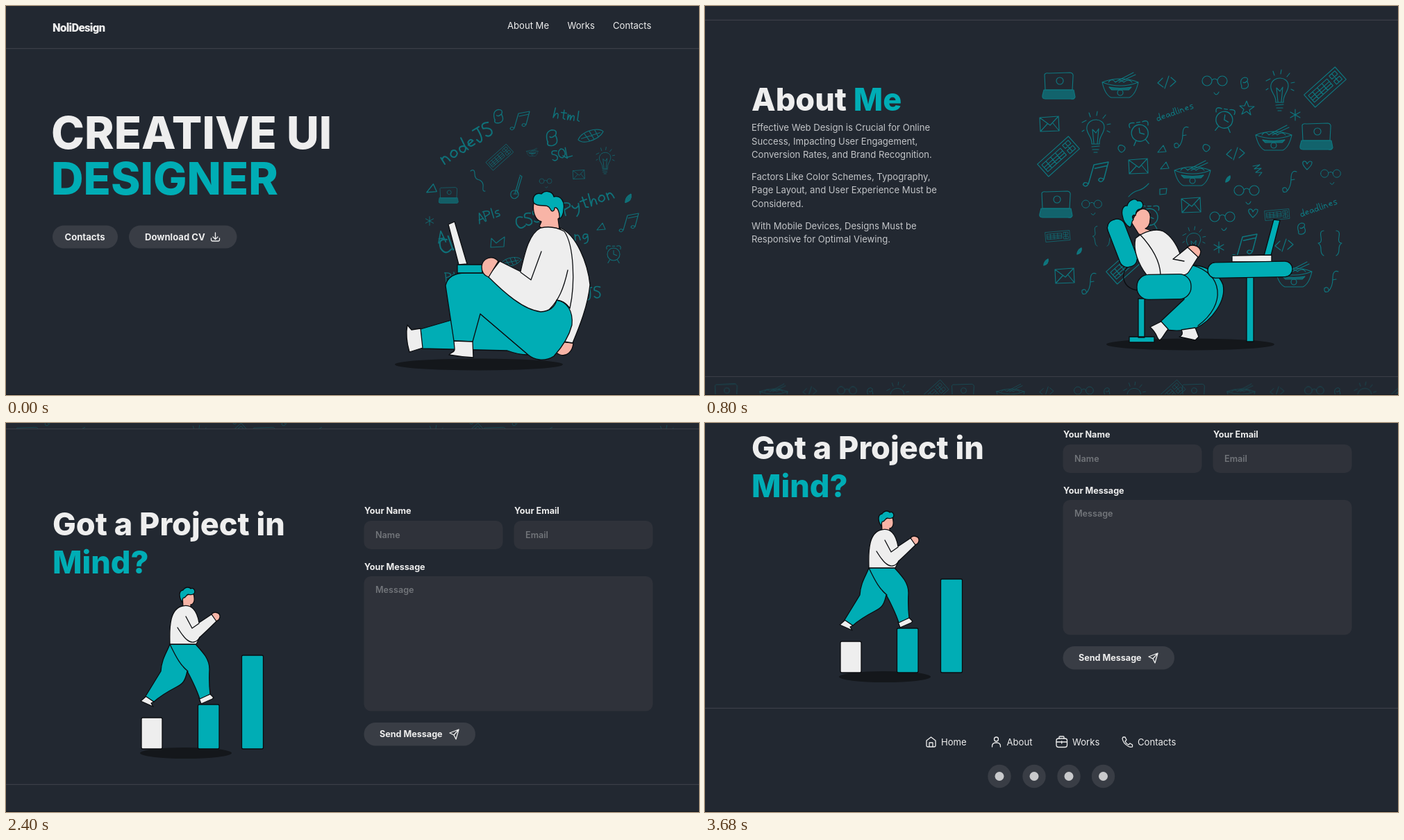
Write an HTML page that moves like this. It is 998 px wide and 561 px high and loops after 4 s.

```html
<!DOCTYPE html>
<html lang="en">
<head>
<meta charset="utf-8">
<title>Portfolio</title>
<style>
html, body { margin: 0; height: 100%; overflow: hidden; background: #222831; }
svg { display: block; width: 998px; height: 561px; }
text { font: 400 13.1px Inter, sans-serif; font-optical-sizing: none; fill: #eee; }
.h1 { font-size: 64.5px; font-weight: 800; }
.h2 { font-size: 45px; font-weight: 800; }
.b { font-weight: 700; }
.label { font-size: 12.6px; font-weight: 700; }
.hint { font-size: 12.6px; font-weight: 600; fill: #72757a; }
.copy text { fill: #c3c5c8; }
.mid { text-anchor: middle; }
.logo { font: 800 16.5px Roboto, sans-serif; font-stretch: 75%; letter-spacing: -.6px; }
.rule { stroke: #3b3e47; stroke-width: 1.2; }
.teal { fill: #00adb5; }
.white { fill: #eee; }
.skin { fill: #f8b4a6; }
.btn { fill: #393d45; }
.field { fill: #2f323a; }
.shade { fill: #14171b; }
.fig { stroke: #0b0d10; stroke-width: 1.3; stroke-linejoin: round; stroke-linecap: round; }
.line { fill: none; }
.icon { fill: none; stroke: #eee; stroke-width: 1.3; stroke-linecap: round; stroke-linejoin: round; }
.doodle { fill: none; stroke: #00adb5; stroke-width: 1.15; stroke-linecap: round; stroke-linejoin: round; }
.doodle .tint { fill: #00adb5; fill-opacity: .75; }
.pitch text { font-size: 5.6px; font-weight: 700; fill: #20242c; }
</style>
</head>
<body>
<svg viewBox="0 0 998 561">
<defs>
  <linearGradient id="lilac" x2="1" y2="1"><stop stop-color="#b07aff"/><stop offset=".5" stop-color="#9440ff"/><stop offset="1" stop-color="#7c10ff"/></linearGradient>
  <linearGradient id="sky" x2="1" y2="1"><stop stop-color="#e8f3fc"/><stop offset=".55" stop-color="#8bc7f2"/><stop offset="1" stop-color="#a674e0"/></linearGradient>
  <linearGradient id="moon" x1=".7" x2=".3" y2="1"><stop offset=".2" stop-color="#0b0d10"/><stop offset=".6" stop-color="#4a4f53"/><stop offset="1" stop-color="#a9adb0"/></linearGradient>
  <radialGradient id="earth"><stop stop-color="#54809c"/><stop offset=".7" stop-color="#2f5f86"/><stop offset="1" stop-color="#12283f"/></radialGradient>
  <clipPath id="band"><path d="M0 8H998V521H0Z"/></clipPath>
  <g id="tile" class="doodle"></g>
</defs>

<g id="page">
  <!-- hero -->
  <g>
    <text class="logo" x="67" y="37">NoliDesign</text>
    <text x="722" y="32.5">About Me</text><text x="808.5" y="32.5">Works</text><text x="874" y="32.5">Contacts</text>
    <path class="rule" d="M0 61.3H998"/>
    <text class="h1" x="65" y="206">CREATIVE UI</text>
    <text class="h1 teal" x="65" y="272">DESIGNER</text>
    <rect class="btn" x="67" y="316.5" width="94" height="33" rx="16.5"/>
    <rect class="btn" x="177" y="316.5" width="155.5" height="33" rx="16.5"/>
    <text class="b mid" x="113.5" y="337.5">Contacts</text><text class="b" x="200" y="337.5">Download CV</text>
    <path class="icon" d="M301.5 327V336M298 333L301.5 336.5L305 333M295.5 335V337Q295.5 339 297.5 339H305.5Q307.5 339 307.5 337V335"/>
    <g id="cloud" class="doodle" opacity=".55"></g>
    <ellipse class="shade" cx="681" cy="517" rx="121" ry="8.5"/>
    <g class="fig">
      <path class="skin" d="M797 484L817 486C816 499 807 506 798 503C789 500 790 492 797 484Z"/>
      <path class="white" d="M798 320C822 330 838 372 841 402C838 432 826 462 816 486L797 483C805 456 812 430 814 412Z"/>
      <path class="teal" d="M597 466L645 452L683 444L752 503C742 503 730 500 722 497L599 494Z"/>
      <path class="white" d="M578 460L584 467L597 465L600 493L581 499C577 485 576 470 578 460Z"/>
      <path class="teal" d="M633 403C636 390 648 385 662 385H694L793 424C808 426 817 440 815 460C810 480 798 495 789 505C775 514 760 510 752 503L683 444L672 484L645 483Z"/>
      <path class="white" d="M645 483L672 484L673 507Q655 506 638 503C640 499 647 500 646 494Z"/>
      <path class="skin" d="M768 318L771 311C761 309 758 294 760 284L790 280L801 294C801 302 797 306 795 307L797 322Q780 326 768 318Z"/>
      <path class="white" d="M770 320Q788 316 804 325C818 345 820 400 812 436C806 427 800 425 793 424C791 432 785 440 770 441C745 438 718 414 694 390L711 368L741 383C748 352 754 328 770 320Z"/>
      <path class="line" d="M771 354L756 395L741 384M809 381C803 408 796 424 783 437"/>
      <path class="teal" d="M760 284C757 275 763 268 771 271C777 265 787 267 789 275C799 273 805 282 803 293C803 300 800 306 797 307C798 298 794 289 790 291C790 296 786 298 784 293C779 283 768 292 760 284Z"/>
      <path class="teal" d="M650 373H686V385H650Z"/>
      <path class="white" d="M637 315L646 311L664 372L652 373Z"/>
      <path class="skin" d="M709 368C700 358 686 364 685 376C685 384 689 389 695 391Z"/>
    </g>
  </g>

  <!-- about -->
  <g transform="translate(0 542)">
    <path class="rule" d="M0 20.3H998"/>
    <text class="h2" x="67" y="151">About <tspan class="teal">Me</tspan></text>
    <g id="copy" class="copy"></g>
    <use href="#tile" opacity=".6"/>
    <ellipse class="shade" cx="699" cy="488" rx="121" ry="8.5"/>
    <g class="fig">
      <path class="line" d="M608 377C598 386 601 407 623 410"/>
      <rect class="teal" x="588" y="306" width="26" height="72" rx="12" transform="rotate(-21 601 342)"/>
      <path class="teal" d="M624 422H633V478H624ZM611 477H647V485H611Z"/>
      <path class="teal" d="M683 379C705 366 738 380 746 402C751 425 730 454 706 465Q684 470 664 467L655 456L690 423Z"/>
      <path class="line" d="M703 374C745 386 752 430 710 461"/>
      <path class="white" d="M641 463L657 455L667 466C660 475 659 479 655 482C650 480 653 474 641 463ZM686 467L706 464L711 477L706 482L683 477Q690 474 686 467Z"/>
      <path class="skin" d="M614 312L622 297C633 287 643 296 641 308C641 316 637 320 634 321L643 324L626 331Z"/>
      <path class="teal" d="M601 302C599 292 604 287 608 288C610 280 619 276 623 281C631 280 634 290 626 293C620 294 621 299 620 302C616 300 614 304 617 308C613 311 616 317 612 319C604 315 602 308 601 302Z"/>
      <path class="skin" d="M693 350C698 342 712 344 714 354Q713 363 706 365Z"/>
      <path class="white" d="M620 335C632 325 650 320 660 325C672 332 679 344 684 357L695 348L710 362L697 383Q694 388 687 388H636C624 372 616 352 620 335Z"/>
      <path class="line" d="M626 329C642 346 655 366 656 387M684 357L674 365L690 368"/>
      <rect class="teal" x="622" y="387" width="78" height="36" rx="17" transform="rotate(-1 661 405)"/>
      <path class="teal" d="M780 391H790V484H780ZM805 360L819 308L828 309L815 360Z"/>
      <path class="white" d="M759 360L816 359V369H759Z"/>
      <rect class="teal" x="724" y="369" width="122" height="22.5" rx="11" transform="rotate(-1 785 380)"/>
    </g>
  </g>

  <!-- works -->
  <g transform="translate(0 1068)">
    <g id="wall" clip-path="url(#band)" opacity=".28"></g>
    <path class="rule" d="M0 8.5H998M0 521.5H998"/>
    <text class="h2" x="67" y="160">My Recent <tspan class="teal">Works</tspan></text>
    <g id="chips"></g>

    <path fill="#7900ff" d="M99 296H300.5V416H99Z"/>
    <path fill="#fff" d="M129 309Q129 305 133 305L146 370L270 405L134 407Q131 407 131 404Z"/>
    <path fill="url(#lilac)" d="M130 309Q129 305.5 134 305.5H266Q270 305.5 270 309V405L157 395Q137 392 135 378Z"/>
    <g fill="#fff"><path d="M211 373H229V378H211Z"/><path opacity=".35" d="M169 373H210V378H169ZM173 367H228V368H173Z"/><rect x="260" y="327" width="24" height="24" rx="4"/></g>
    <circle cx="272" cy="339" r="6.5" fill="#7900ff"/>
    <path fill="#6a3fd0" d="M199 325H217V339H199Z"/>
    <path fill="#f6a13c" d="M197 327H206V334H197ZM192 345H210V353H192ZM214 333H218V345H214Z"/>
    <path fill="#35206b" d="M181 341H187V354H181ZM219 339H225V354H219ZM204 335H210V348H204ZM175 353H228V354H175Z"/>
    <g fill="#f5c2a8"><circle cx="184" cy="338" r="2"/><circle cx="222" cy="336" r="2"/><circle cx="207" cy="332" r="2"/></g>
    <text class="b mid" x="200" y="363" style="font-size:6.7px">LEARN UI/UX DESIGN</text>
    <text x="135" y="311" style="font-size:3px">COURSES</text><text x="192" y="311" style="font-size:3px">Home &#160; Lessons &#160; Contact &#160; About</text>

    <path fill="#c9cbce" d="M512 359L551 360L596 374L540 392L500 382Z"/>
    <path stroke="#f2f2f2" stroke-width="1.2" d="M528 364L578 376M519 368L567 381M510 373L556 386"/>
    <rect x="473" y="305" width="78" height="57" rx="3" fill="#f7f8fa"/>
    <path fill="url(#sky)" d="M513 310Q532 313 548 310V360H505Q523 340 513 310Z"/>
    <path fill="#5b52b8" d="M520 327L535 323L540 344L522 347Z"/>
    <g class="pitch"><text x="477" y="326">Start Working</text><text x="477" y="333">as a UI/UX Designer</text></g>
    <g transform="translate(426 316) rotate(19)">
      <rect width="93" height="70" rx="4" fill="#f4f6f9"/>
      <path fill="url(#sky)" d="M52 10Q70 16 90 8V66H44Q62 42 52 10Z"/>
      <path fill="#5b52b8" d="M58 30L73 25L78 42L85 56L62 60Z"/><path fill="#2b2f45" d="M60 50L84 48L80 64L66 66Z"/><circle cx="66" cy="24" r="4" fill="#e77e6b"/>
      <g class="pitch"><text x="5" y="14">Start Working</text><text x="5" y="22">as a UI/UX Designer</text></g>
      <rect x="5" y="33" width="12" height="4" rx="2" fill="#53bde3"/>
    </g>

    <g id="phones"></g>
    <circle cx="799" cy="333" r="22.5" fill="url(#moon)" stroke="#e7664c" stroke-width=".8"/>
    <text class="b mid" x="797.5" y="365" style="font-size:5.7px">Explore Our Solar</text>
    <text class="b mid" x="797.5" y="372" style="font-size:5.7px">System</text>
    <path stroke="#8c8f92" stroke-width=".7" d="M783 378H812M787 381H808"/>
    <rect x="788" y="388" width="19" height="7" rx="3.5" fill="none" stroke="#e7664c"/>
    <text class="mid" x="797.5" y="393" style="font-size:3.5px">Start</text>
  </g>

  <!-- contact -->
  <g transform="translate(0 1581)">
    <path class="rule" d="M0 521.3H998"/>
    <text class="h2" x="67" y="162">Got a Project in</text><text class="h2 teal" x="67" y="217">Mind?</text>
    <ellipse class="shade" cx="259" cy="476" rx="66" ry="8"/>
    <g class="fig">
      <rect class="white" x="195" y="425" width="30" height="45" rx="2"/>
      <rect class="teal" x="276.5" y="406" width="30.5" height="64" rx="2"/>
      <rect class="teal" x="339.5" y="335" width="31" height="135" rx="2"/>
      <path class="white" d="M202 394L213 402L209 404L212 409L194 401ZM278 397L294 391L299 396L297 398L281 405Z"/>
      <path class="teal" d="M236 319H273C283 330 293 340 293 355Q292 375 294 391L279 398C275 385 265 365 261 358C258 372 255 376 245 381Q224 392 213 402L201 394L223 358C224 340 232 330 236 319Z"/>
      <path class="line" d="M236 319C246 340 252 350 262 358"/>
      <path class="skin" d="M254 249L270 246C272 253 272 261 266 262V266L255 266Z"/>
      <path class="teal" d="M254 259C249 252 248 242 255 241C259 235 265 237 266 239C272 236 274 246 269 247C264 249 262 245 260 249L257 252Q254 251 254 259Z"/>
      <path class="skin" d="M296 276C299 271 309 273 308 280Q307 285 302 286Z"/>
      <path class="white" d="M236 319C235 290 237 268 254 264C267 261 275 270 278 288L296 276L303 286Q289 300 279 309L274 319Z"/>
      <path class="line" d="M259 279L268 296L278 289M247 295C255 308 262 317 270 316Q276 315 279 309"/>
    </g>
    <text class="label" x="516" y="131">Your Name</text><text class="label" x="732" y="131">Your Email</text><text class="label" x="516" y="211.5">Your Message</text>
    <rect class="field" x="515.5" y="141" width="200" height="41" rx="10"/>
    <rect class="field" x="731.5" y="141" width="200" height="41" rx="10"/>
    <rect class="field" x="515.5" y="221" width="416" height="194.5" rx="10"/>
    <text class="hint" x="532" y="166">Name</text><text class="hint" x="748" y="166">Email</text><text class="hint" x="532" y="244.5">Message</text>
    <rect class="btn" x="515.5" y="432" width="160.5" height="33.5" rx="16.7"/>
    <text class="label" x="538" y="453">Send Message</text>
    <path class="icon" d="M652 442L639 447L645 450L648 456ZM652 442L645 450"/>
  </g>

  <!-- footer -->
  <g transform="translate(0 1691)">
    <text x="340" y="465">Home</text><text x="434.5" y="465">About</text><text x="529" y="465">Works</text><text x="623" y="465">Contacts</text>
    <g class="icon">
      <path d="M319 458L325.5 453L332 458V465Q332 467 330 467H321Q319 467 319 465ZM323 467V461H328V467"/>
      <circle cx="419.5" cy="456" r="3"/><path d="M413.5 467Q413 461 419.5 461T425.5 467"/>
      <rect x="506" y="455" width="15.5" height="12.5" rx="3"/><path d="M510 455V453Q510 452 511 452H516Q517 452 517 453V455M506 460H521.5M513.7 459V462"/>
      <path d="M602 453H605L607 457L605 459Q607 463 610 464L612 462L615.5 464V467Q613 468 610 466.5Q602 462 601 455Z"/>
    </g>
    <g id="social"></g>
  </g>
</g>
<path stroke="#15191f" d="M0 560.5H998"/>
</svg>

<script>
const $ = id => document.getElementById(id);

const shapes = {
  laptop: 'M-19 6L-20-16Q-19-19-14-18L17-19Q22-18 21-13L20 6ZM-3-7a5 5 0 1 0 10 0a5 5 0 1 0-10 0',
  bowl: 'M-26-5Q0-15 26-5Q22 13 13 17H-13Q-22 13-26-5ZM-26-5Q0 5 26-5M-17-5Q-12-12-7-5Q0-11 5-5Q12-11 17-5M-6-6L19-19M-2-5L22-16M-4 10a4 4 0 1 0 8 0a4 4 0 1 0-8 0',
  code: 'M-6-6L-13 1L-5 7M3-9L-3 9M6-7L13-1L5 6',
  glasses: 'M-18-3a7 7 0 1 0 14 0a7 7 0 1 0-14 0M4-3a7 7 0 1 0 14 0a7 7 0 1 0-14 0M-4-4Q0-8 4-4M-1 14Q3 20 6 13',
  bulb: 'M-6 17C-5 6-15 2-13-8C-10-22 12-21 12-7C12 2 4 6 5 17ZM-6 21L5 20M-5 25H4M-3 29H2M-3 16L-5-4L0 1L4-5L2 16M-20-14L-14-17M-10-28L-8-22M2-30L1-24M14-25L10-20M21-12L16-11M20 0L16-2M-20-1L-17-3',
  keys: 'M-30-12H30V12H-30ZM-26-7H10V6H-26ZM-26-2H10M-26 2H10M-18-7V6M-9-7V6M0-7V6M15-8H26V-2H15ZM15 2H26V8H15ZM20-8V8',
  mail: 'M-14-9L13-11L14 10L-13 11ZM-14-9L1 2L13-11M-13 11L-3 0M14 10L5-1',
  clock: 'M-10 1a10 10 0 1 0 20 0a10 10 0 1 0-20 0M0-5V1L5 3M-11-7Q-13-14-5-12M5-12Q13-14 11-7M-6 10L-9 15M6 10L9 15M-2-12H2',
  star: 'M0-10L3-2L11-2L4 3L6 10L0 5L-7 9L-4 2L-10-3L-3-3Z',
  spark: 'M0-8V8M-7-4L7 4M-7 4L7-4',
  note: 'M-9 11L-3-10L13-13L8 6M-2-6L12-9M-9 11q-5-3-6 1q3 4 6-1M8 6q-5-3-6 1q3 4 6-1',
  clef: 'M10-15Q2-18 2-5T-5 14Q-11 16-10 9Q-5 6-4 11M2-3L7-4',
  ring: 'M-5 0Q-5-7 1-5Q8-2 3 3Q-1 8-5 0Z',
  tri: 'M-6 4L2-6L6 3Z',
  box: 'M-5-4L5-5L4 3L-5 4Z',
  zig: 'M-6-6L4-8L-4-2L6-3L-2 3L7 3L3 8',
  heart: 'M0 6Q-9-3-5-6Q-1-7 0-2Q3-8 7-5Q8-1 0 6Z',
  leaf: 'M-3 4Q-3-2 3-5Q4 2-3 4ZM-2 3L2-3',
  braces: 'M-9-18Q-15-18-13-9T-17 0Q-13 2-13 9T-9 18M9-18Q15-18 13-9T17 0Q13 2 13 9T9 18',
  swirl: 'M-4 5Q-8-6 0-8Q6-8 4-3Q0 1-2-1M4-2Q8 6 1 8Q-6 9-4 4',
  stroke: 'M-14 9Q-8 2 0 0T15-10',
  board: 'M-19 0Q-11-9 6-7Q17-5 19 0Q11 8-6 7Q-16 6-19 0ZM-14 0H14M-8-6L-4 6M0-7L3 6M8-6L10 5',
  guitar: 'M-4 4Q-9 5-8 12Q-4 19 2 13Q5 8 0 4ZM-2 8L5-16M1 7L8-16L5-18M-4 9H1',
  wave: 'M-9-14Q-3-18-3-10T4-1Q10 2 9 9T12 15',
  crown: 'M-10 7L-9-6L-2 1L3-3L10-8L9 6Z'
};
const tints = {
  laptop: 'M-21 6H22L24 16Q23 20 18 19H-19Q-24 19-23 14Z',
  bowl: 'M-16 2Q0 5 16 2L12 6H-12Z',
  leaf: shapes.leaf
};
const glyphs = {
  n: 'M0-6V0M0-4Q4-8 5 0', o: 'M3-6Q-1-5 0-2Q2 1 5-2Q6-6 2-6', d: 'M5-4Q0-7 0-2Q2 2 5-2L6-11M5-4L6 0',
  e: 'M0-3L5-4Q4-7 1-5Q-1 0 5-1', a: 'M5-5Q0-7 0-2Q2 2 5-4L6 0', l: 'M1-11V-1L3 0', i: 'M1-6V0M1-9V-8',
  s: 'M5-6Q0-7 1-4Q6-2 4 0H0', h: 'M1-11L0 0Q3-8 5-4V0', t: 'M3-10V-1L5 0M0-7H6', m: 'M0-6V0Q2-8 3-4V0Q5-8 7-4V0',
  y: 'M0-6Q1-1 5-4M6-6Q5 2 1 4', g: 'M5-5Q0-7 0-2Q2 1 5-4Q6 4 1 4', P: 'M1-11L0 0M0-11Q9-10 6-6L1-5',
  A: 'M0 0L4-11L7 0M1-4H6', I: 'M2-11L1 0', J: 'M1-11H7M5-11Q5 1 1 0L0-3', S: 'M7-10Q1-13 1-8Q8-5 5-1Q2 1 0-2',
  Q: 'M4-11Q-1-9 0-4Q3 2 7-4Q8-10 4-11M4-3L8 1', L: 'M1-11L0 0H6', C: 'M7-9Q1-13 0-5Q1 2 7-1'
};

const at = (x, y, turn, scale, body) =>
  `<g transform="translate(${x} ${y}) rotate(${turn}) scale(${scale})">${body}</g>`;

// Each spot is "x y scale turn".
const stamp = (name, spots) => spots.split(',').map(spot => {
  const [x, y, scale = 1, turn = 0] = spot.split(' ');
  const tint = tints[name] ? `<path class="tint" d="${tints[name]}"/>` : '';
  return at(x, y, turn, scale, `<path d="${shapes[name]}"/>` + tint);
}).join('');
const scatter = plan => Object.entries(plan).map(([name, spots]) => stamp(name, spots)).join('');

function write(word, x, y, scale, turn) {
  let pen = 0, body = '';
  for (const c of word) {
    body += `<path d="${glyphs[c]}" transform="translate(${pen})"/>`;
    pen += 'liI'.includes(c) ? 4 : c === 'm' ? 10 : 8;
  }
  return at(x, y, turn, scale, body);
}

$('tile').innerHTML = scatter({
  laptop: '509 115,880 188,505 286',
  bowl: '598 115,819 191,702 242,848 388',
  code: '665 110,764 213,834 345',
  glasses: '734 111,780 269,745 307,557 288 .8,901 244 .8',
  bulb: '828 122,563 182,704 342 .8',
  keys: '893 117 1 -42,509 217 1 -42,608 372 1 -42,508 332 .58 -5,824 301 .58 -5',
  mail: '496 170,624 231,700 287,518 389',
  clock: '626 182 1.2 -8,748 163 1.2 8,640 303 1.2',
  star: '780 147', spark: '850 157,740 348',
  note: '564 242 1.3,778 346 1.3', clef: '686 190,842 254,553 401,902 398',
  ring: '600 206,722 205', tri: '658 207,662 231', box: '660 268', zig: '795 237',
  heart: '867 230,789 299', leaf: '753 250,539 354,491 370',
  braces: '572 332 .8,900 342', swirl: '777 111,859 321', stroke: '624 266'
}) + write('deadlines', 652, 166, .9, -20) + write('deadlines', 859, 304, .9, -20);

$('cloud').innerHTML = scatter({
  swirl: '709 159 1.2,786 190 1.4', note: '741 165,898 312', keys: '711 218 .65 -42',
  bowl: '758 211 .32', board: '842 187 1 -18,727 369 .8 -12', bulb: '863 223 .65', guitar: '735 262',
  wave: '678 252', laptop: '637 273 .6', tri: '613 264 1.2,857 319', spark: '610 310 .8',
  glasses: '777 254 .5', leaf: '896 278 1.3', clock: '875 357 .9', mail: '825 243 .6', crown: '708 341'
}) + write('nodeJS', 632, 228, 1.8, -32) + write('html', 788, 161, 1.3, 8) + write('SQL', 788, 224, 1.3, -16)
  + write('Python', 806, 302, 1.65, -20) + write('APIs', 682, 314, 1.3, -22) + write('CSS', 738, 322, 1.6, -20)
  + write('ng', 820, 338, 1.4, -5) + write('CL', 630, 358, 1.9, -25) + write('JS', 836, 424, 1.5, -10)
  + write('A', 623, 342, 1.5, -10) + write('Pt', 634, 398, 1.2, -10);

$('wall').innerHTML = [0, 341, 673].map(x => [0, 250, 500].map(y =>
  `<use href="#tile" transform="translate(${x + 30} ${y + 34}) scale(.775) translate(-509 -115)"/>`).join('')).join('');

$('copy').innerHTML = [
  'Effective Web Design is Crucial for Online', 'Success, Impacting User Engagement,', 'Conversion Rates, and Brand Recognition.',
  'Factors Like Color Schemes, Typography,', 'Page Layout, and User Experience Must be', 'Considered.',
  'With Mobile Devices, Designs Must be', 'Responsive for Optimal Viewing.'
].map((line, i) => `<text x="67" y="${180 + i * 19.6 + Math.floor(i / 3) * 12}">${line}</text>`).join('');

$('chips').innerHTML = [['All', 67, 61], ['UI', 139, 61], ['UX', 211, 61], ['Web Design', 283, 120]].map(([name, x, w]) =>
  `<rect class="btn" x="${x}" y="193" width="${w}" height="33.5" rx="16.7"/>
   <text class="b mid" x="${x + w / 2}" y="214.3">${name}</text>`).join('')
  + [67, 365.5, 664].map(x =>
    `<rect x="${x}" y="260" width="267.5" height="193.5" rx="11" fill="#343940" opacity=".8"/>`).join('');

const phone = (x, turn, w, screen) => at(x, 357.5, turn, 1,
  `<rect x="${-w / 2}" y="-57" width="${w}" height="113" rx="8" fill="#0aa5ad"/>
   <rect x="${3 - w / 2}" y="-54" width="${w - 6}" height="107" rx="6" fill="#202123"/>${screen}`);
const rows = (count, x, y, w, gap, colour) => Array.from({ length: count }, (_, i) =>
  `<path stroke="${colour}" stroke-width=".9" d="M${x} ${y + i * gap}h${w - i * 5 % 11}"/>`).join('');
$('phones').innerHTML = phone(729, -5, 52,
    `<text x="-19" y="-40" style="font-size:4px">PLANETS</text><circle cx="17" cy="-37" r="4" fill="#ee5350"/>
     ${rows(8, -17, -29, 14, 10, '#55585b')}
     <rect x="-20" y="-13" width="39" height="15" rx="4" fill="#26282b" stroke="#ee6b58"/>
     <text x="-17" y="-4" style="font-size:4px">EARTH</text><circle cx="13" cy="-5.5" r="5" fill="url(#moon)"/>`)
  + phone(797, 0, 57, '')
  + phone(865, 6, 51,
    `<path fill="#ee5350" d="M-22.5-48Q-22.5-54-16.5-54H16.5Q22.5-54 22.5-48V8Q0 20-22.5 8Z"/>
     <text class="mid" y="-40" style="font-size:4.5px">THE EARTH</text>
     <circle cy="-15" r="22" fill="url(#earth)"/>
     <path fill="#b59a7c" d="M-15-26Q-4-34 4-27L-2-18L-9-14ZM-3-9Q8-12 9-4L2 5Z"/>
     <path fill="#dfe6ea" d="M5-32Q17-27 18-17L9-22ZM-18-8L-8-6L-6 2Q-14 0-18-8ZM12-10L19-8L13 0Z"/>
     ${rows(6, -16, 20, 27, 4, '#c65a52')}
     <circle cx="-17" cy="47" r="4" fill="#ee5350"/>`);

$('social').innerHTML = [424, 474, 524, 573.5].map(x =>
  `<circle class="btn" cx="${x}" cy="509.5" r="16.7"/><circle cx="${x}" cy="509.5" r="6.5" fill="#c9cacc"/>`).join('');

const stops = [0, 542, 1068, 1581, 1691];
function draw() {
  const stop = stops[Math.floor(performance.now() % 4000 / 800)];
  $('page').setAttribute('transform', `translate(0 ${-stop})`);
  requestAnimationFrame(draw);
}
draw();
</script>
</body>
</html>
```
